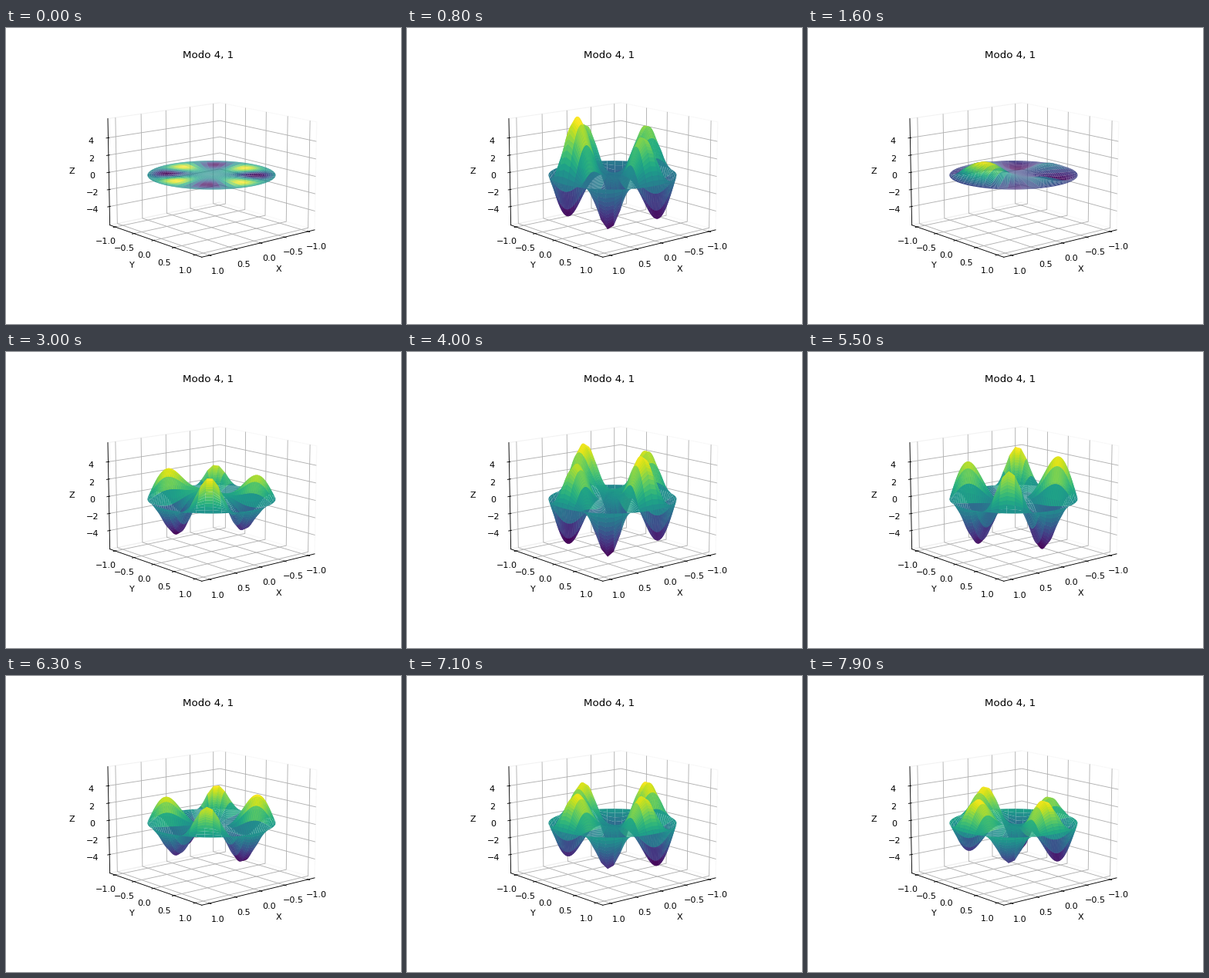
These frames come from a looping animation (512x384 px, 8 s). A matplotlib script:

```python
import numpy as np
import matplotlib.pyplot as plt
from matplotlib.animation import FuncAnimation

FRAMES, STEP = 80, 0.025
AMP = 5.1                                # peak height of the main mode
HIT_X, HIT_SIZE, HIT_POWER = 0.7, 0.18, 16.0
MARGIN = 25 / 24

tau = (np.arange(64) + 0.5) * np.pi / 64


def bessel(m, x):
    x = np.asarray(x, float)[..., None]
    return np.cos(m * tau - x * np.sin(tau)).mean(axis=-1)


def zeros(m, top=20):
    x = np.arange(0.5, top, 0.01)
    y = bessel(m, x)
    i = np.flatnonzero(y[:-1] * y[1:] < 0)
    return x[i] - y[i] * 0.01 / (y[i + 1] - y[i])


r, theta = np.meshgrid(np.linspace(0, 1, 50), np.linspace(0, 2 * np.pi, 50))
X, Y = r * np.cos(theta), r * np.sin(theta)

K41 = zeros(4)[0]
main = bessel(4, K41 * r) * np.cos(4 * theta)
main *= AMP / main.max()

# Modes excited by a soft tap on the x axis
shapes, freqs = [], []
for m in range(10):
    for k in zeros(m):
        gain = (2 if m == 0 else 4) * HIT_POWER * HIT_SIZE ** 2
        gain *= np.exp(-(k * HIT_SIZE) ** 2 / 2) * bessel(m, k * HIT_X)
        gain /= k * bessel(m + 1, k) ** 2
        shapes.append(gain * bessel(m, k * r) * np.cos(m * theta))
        freqs.append(k)
shapes, freqs = np.array(shapes), np.array(freqs)


def height(t):
    ripple = np.tensordot(np.sin(freqs * t), shapes, 1)
    return main * (np.sin(K41 * t) + 1e-4) + ripple


def corners(a):
    return np.stack([a[:-1, :-1], a[:-1, 1:], a[1:, 1:], a[1:, :-1]], -1).reshape(-1, 4)


fig = plt.figure(figsize=(6.4, 4.8), dpi=80)
ax = fig.add_subplot(projection="3d")
surf = ax.plot_surface(X, Y, height(0), cmap="viridis", rcount=50, ccount=50)
ax.set(xlabel="X", ylabel="Y", zlabel="Z", title="Modo 4, 1")
ax.set_xlim(-1.1 * MARGIN, 1.1 * MARGIN)
ax.set_ylim(-1.1 * MARGIN, 1.1 * MARGIN)
ax.set_zlim(-5.95 * MARGIN, 5.95 * MARGIN)
ax.set_xticks(np.linspace(-1, 1, 5))
ax.set_yticks(np.linspace(-1, 1, 5))
ax.set_zticks(range(-4, 5, 2))
for axis in (ax.xaxis, ax.yaxis, ax.zaxis):
    axis.pane.fill = False
ax.view_init(elev=13, azim=50)

QX, QY = corners(X), corners(Y)


def update(n):
    z = corners(height(n * STEP))
    surf.set_verts(np.stack([QX, QY, z], -1))
    mean = z.mean(axis=1)
    surf.set_array(mean)
    surf.set_clim(mean.min(), mean.max())
    return (surf,)


anim = FuncAnimation(fig, update, frames=FRAMES, init_func=lambda: (surf,),
                     interval=100, repeat=True, repeat_delay=0, blit=False)
plt.show()
```
